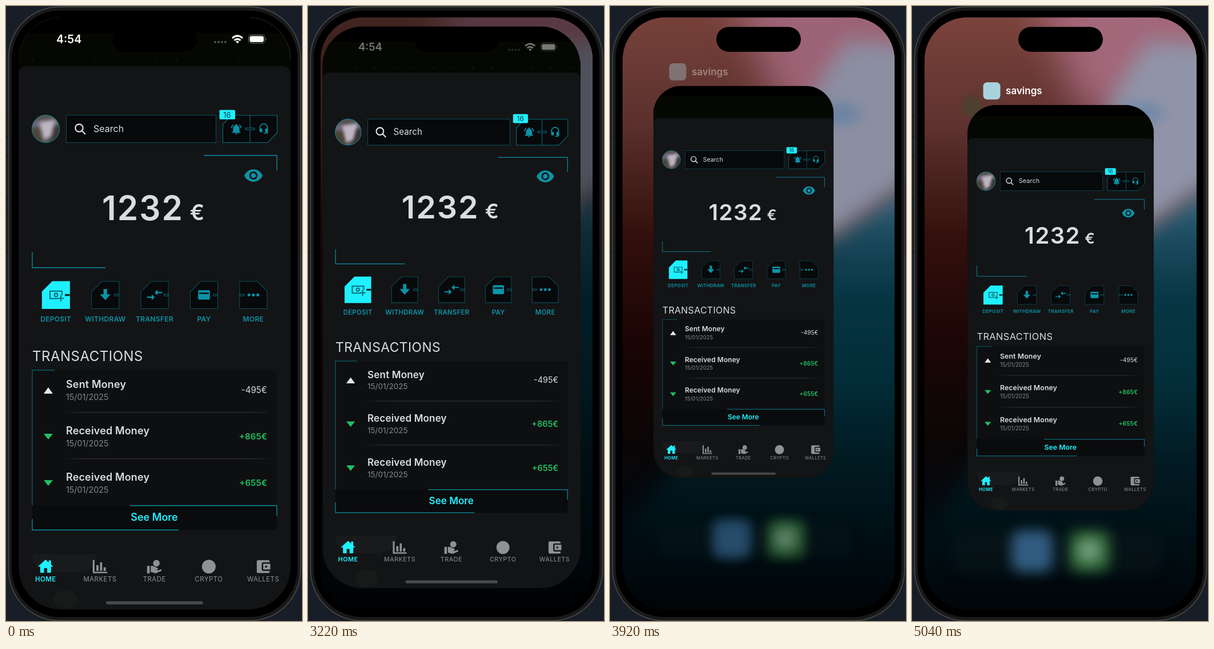
An HTML page that plays this animation: 518 px wide and 1074 px high, repeating every 8000 ms.

```html
<!DOCTYPE html>
<html lang="en">
<head>
<meta charset="utf-8">
<title>App switcher</title>
<style>
  html, body { margin: 0; width: 100%; height: 100%; overflow: hidden; background: #181e27; }
  svg { display: block; width: 100vw; height: 100vh; }
  filter { color-interpolation-filters: sRGB; }
  text { font-family: Inter, "Open Sans", sans-serif; fill: #d9dde1; }
  .b { font-weight: 600; }
  .line { fill: none; stroke: #0b8fa2; stroke-width: 1.3; }
  .box { fill: #07090b; stroke: #0b4c56; stroke-width: 1.1; }
</style>
</head>
<body>
<svg viewBox="0 0 518 1074" preserveAspectRatio="none">
  <defs>
    <clipPath id="screen"><rect x="22" y="20" width="476" height="1034" rx="74"/></clipPath>
    <clipPath id="face"><circle cx="69.5" cy="214.5" r="24"/></clipPath>
    <linearGradient id="red" x2="0" y2="1">
      <stop stop-color="#7b433c"/><stop offset=".18" stop-color="#5e322f"/>
      <stop offset=".37" stop-color="#34100d"/><stop offset=".55" stop-color="#1b0605"/>
      <stop offset=".72" stop-color="#0b0607"/><stop offset=".85" stop-color="#030b10"/>
      <stop offset="1" stop-color="#000508"/>
    </linearGradient>
    <linearGradient id="teal" gradientUnits="userSpaceOnUse" x1="0" y1="310" x2="0" y2="1054">
      <stop stop-color="#3a7088"/><stop offset=".12" stop-color="#1d4d60"/>
      <stop offset=".27" stop-color="#073644"/><stop offset=".45" stop-color="#03303b"/>
      <stop offset=".66" stop-color="#021a22"/><stop offset=".85" stop-color="#010f15"/>
      <stop offset="1" stop-color="#000508"/>
    </linearGradient>
    <linearGradient id="fade"><stop stop-color="#333537" stop-opacity="0"/><stop offset=".1" stop-color="#333537"/>
      <stop offset=".9" stop-color="#333537"/><stop offset="1" stop-color="#333537" stop-opacity=".3"/></linearGradient>
    <filter id="wide" x="-50%" y="-50%" width="200%" height="200%"><feGaussianBlur stdDeviation="32"/></filter>
    <filter id="mid" x="-50%" y="-50%" width="200%" height="200%"><feGaussianBlur stdDeviation="18"/></filter>
    <filter id="soft" x="-50%" y="-50%" width="200%" height="200%"><feGaussianBlur stdDeviation="11"/></filter>
    <filter id="fine" x="-50%" y="-50%" width="200%" height="200%"><feGaussianBlur stdDeviation="3"/></filter>
  </defs>

  <!-- phone body -->
  <g fill="#1d1d1e" stroke="#050506">
    <path d="M-2 190.500H5V228H-2zM-2 262.500H5V336H-2zM-2 356.500H5V430H-2zM514 310.500H520V428H514z"/>
  </g>
  <rect x="4.500" y="1.500" width="511" height="1072" rx="89" fill="#19191a" stroke="#4b4b4d" stroke-width="1.500"/>
  <rect x="10" y="8" width="500" height="1059" rx="84"/>

  <g clip-path="url(#screen)">
    <g id="wallpaper">
      <rect x="22" y="20" width="476" height="1034" fill="url(#red)"/>
      <path d="M200 -60H600V160L300 190z" fill="#a3677a" filter="url(#wide)"/>
      <path d="M580 270L380 405L240 620L75 850L-40 1000V1140H580z" fill="url(#teal)" filter="url(#mid)"/>
      <path d="M345 165L412 62L580 70V272L385 408L320 400z" fill="#9094a8" filter="url(#mid)"/>
      <ellipse cx="402" cy="188" rx="38" ry="18" fill="#5f82a8" opacity=".7" filter="url(#soft)"/>
    </g>
    <g id="dock">
      <circle cx="105" cy="175" r="18" fill="#4d4030" filter="url(#fine)"/>
      <rect x="70" y="914" width="370" height="76" rx="26" fill="#0a161a" opacity=".65" filter="url(#soft)"/>
      <rect x="174" y="916" width="72" height="72" rx="18" fill="#305c80" filter="url(#soft)"/>
      <rect x="275" y="916" width="72" height="72" rx="18" fill="#2f6638" filter="url(#soft)"/>
      <circle cx="310" cy="951" r="20" fill="#7ba484" opacity=".9" filter="url(#soft)"/>
    </g>
    <rect id="dim" x="22" y="20" width="476" height="1034"/>
    <g id="label">
      <rect width="30" height="30" rx="7" fill="#a8d3dd"/>
      <text class="b" x="39.500" y="21" font-size="17" style="fill:#fff">savings</text>
    </g>
    <g id="card"></g>
    <rect x="186" y="36.500" width="148" height="43.500" rx="21.700"/>
  </g>
</svg>

<script>
const $ = id => document.getElementById(id);
const TEAL = '#0b93a6', CYAN = '#1ff0ff', GREEN = '#21c065', GREY = '#8f9193';

const text = (x, y, size, str, o = {}) =>
  `<text x="${x}" y="${y}" font-size="${size}" class="${o.bold ? 'b' : ''}" text-anchor="${o.anchor || 'start'}"
    letter-spacing="${o.gap || 0}" ${o.color ? `style="fill:${o.color}"` : ''}>${str}</text>`;
// Icons live on a 24-unit grid and are centred on (x, y).
const icon = (x, y, scale, d, color = TEAL) =>
  `<path transform="translate(${x} ${y}) scale(${scale}) translate(-12 -12)" d="${d}" fill="${color}" fill-rule="evenodd"/>`;
const line = (d, extra = '') => `<path class="line" d="${d}" ${extra}/>`;

const ICONS = {
  eye: 'M12 4.5C7 4.5 2.7 7.6 1 12c1.700 4.400 6 7.500 11 7.500s9.300-3.100 11-7.500c-1.700-4.400-6-7.500-11-7.500zM12 17a5 5 0 1 1 0-10 5 5 0 0 1 0 10zM12 15a3 3 0 1 0 0-6 3 3 0 0 0 0 6z',
  bell: 'M12 22a2 2 0 0 0 2-2h-4a2 2 0 0 0 2 2zM18 16v-5c0-3.100-1.600-5.600-4.500-6.300V4a1.500 1.500 0 0 0-3 0v.7C7.600 5.400 6 7.900 6 11v5l-2 2v1h16v-1zM2 10c.2-3 1.500-5.500 4-7l1 1.500C5 6 4 8 4 10zM22 10c-.2-3-1.500-5.500-4-7l-1 1.500C19 6 20 8 20 10z',
  headset: 'M12 1a9 9 0 0 0-9 9v7a3 3 0 0 0 3 3h3v-8H5v-2a7 7 0 0 1 14 0v2h-4v8h4v1h-7v2h6a3 3 0 0 0 3-3V10a9 9 0 0 0-9-9z',
  down: 'M9 2h6v9h6l-9 10-9-10h6z',
  swap: 'M-1 15h8v-4l5 5-5 5v-4h-8zM25 7h-8V3l-5 5 5 5V9h8z',
  pay: 'M4 4h16a2 2 0 0 1 2 2v12a2 2 0 0 1-2 2H4a2 2 0 0 1-2-2V6a2 2 0 0 1 2-2zM4 8v2.500h16V8z',
  more: 'M7 12a2.500 2.500 0 1 1-5 0 2.500 2.500 0 0 1 5 0zM14.500 12a2.500 2.500 0 1 1-5 0 2.500 2.500 0 0 1 5 0zM22 12a2.500 2.500 0 1 1-5 0 2.500 2.500 0 0 1 5 0z',
  home: 'M10 20v-6h4v6h5v-8h3l-3-2.700V4h-3v2.600L12 3 2 12h3v8z',
  bars: 'M2 3h2.500v16H22v2H2zM7 10h3v8H7zM12 6h3v12h-3zM17 13h3v5h-3z',
  trade: 'M20 7a5 5 0 1 1-10 0 5 5 0 0 1 10 0zM1 11h4v11H1zM6.500 11h3l7 3q2 2-.5 3h-4l6 .5 3-1.500q2.500 0 1.500 2.500L14 22l-7.500-2z',
  coin: 'M22 12a10 10 0 1 1-20 0 10 10 0 0 1 20 0z',
  wallet: 'M21 18v1a2 2 0 0 1-2 2H5a2 2 0 0 1-2-2V5a2 2 0 0 1 2-2h14a2 2 0 0 1 2 2v1h-9a2 2 0 0 0-2 2v8a2 2 0 0 0 2 2zM12 16h10V8H12zM16 13.500a1.500 1.500 0 1 1 0-3 1.500 1.500 0 0 1 0 3z'
};

function statusBar() {
  const dots = [366, 372, 378, 384].map(x => `<circle cx="${x}" cy="63" r="2" fill="#505153"/>`).join('');
  const wave = (r, y) => `<path d="M${405 - r} ${y}Q405 ${y - r * .85} ${405 + r} ${y}" fill="none" stroke="#fff" stroke-width="3"/>`;
  return `<g id="status">${text(88, 65, 19.500, '4:54', { bold: 1, color: '#fff' })}${dots}
    ${wave(9, 56)}${wave(5.500, 60)}<path d="M402 62q3-2 6 0l-3 3.500z" fill="#fff"/>
    <rect x="424.500" y="50.500" width="28.500" height="14.500" rx="4.500" fill="none" stroke="#77797a"/>
    <rect x="426.500" y="52.500" width="24.500" height="10.500" rx="3" fill="#fff"/>
    <path d="M454.500 55.500q2 2 0 4.500z" fill="#77797a"/></g>`;
}

function header() {
  let dots = '';
  for (let x = 47; x < 490; x += 36)
    for (const y of [96, 267, 298, 329, 360, 391]) dots += `<circle cx="${x}" cy="${y}" r=".8"/>`;
  return `<g fill="#34383b">${dots}</g>
    <g clip-path="url(#face)"><g filter="url(#fine)">
      <rect x="30" y="175" width="80" height="80" fill="#54504e"/>
      <path d="M40 200H100V212H40z" fill="#6d6478"/>
      <path d="M58 203L86 198L84 226L66 234z" fill="#bdb5c4"/>
      <path d="M30 216L60 212L68 255H30z" fill="#4c4339"/><path d="M84 208H110V255H72z" fill="#3a3533"/>
    </g></g>
    <circle cx="69.500" cy="214.500" r="24" class="line" style="stroke-width:1"/>
    <rect class="box" x="105.500" y="190.500" width="262" height="48"/>
    <g fill="none" stroke="#dfe3e6" stroke-width="2.200"><circle cx="128" cy="213" r="6.700"/><path d="M133 218l6 6"/></g>
    ${text(153, 219.500, 16, 'Search')}
    <path class="box" style="stroke:#0b6c79" d="M379.500 238.500V207L395 191H474.500V221L458 238.500zM427 191V238.500"/>
    <path d="M419 213h16v3h-16z" fill="#07090b" stroke="${TEAL}" stroke-width=".8"/>
    ${icon(403, 215, .92, ICONS.bell)}${icon(451, 214, .82, ICONS.headset)}
    <rect x="373.500" y="181.500" width="27.500" height="16.500" rx="2" fill="${CYAN}"/>
    ${text(387, 194.500, 13, '16', { anchor: 'middle', color: '#0a3f48' })}
    ${line('M346 261H474V287.500M46 430V457H174')}
    ${icon(433, 296, 1.45, ICONS.eye)}
    ${text(168, 374, 58.500, '1232', { bold: 1, gap: 2 })}${text(321.500, 374, 38, '€', { bold: 1 })}`;
}

function actions() {
  return ['DEPOSIT', 'WITHDRAW', 'TRANSFER', 'PAY', 'MORE'].map((name, i) => {
    const x = 87.3 + 86.4 * i, first = i === 0, last = i === 4, L = x - 24, R = x + 24;
    const shape = last ? `M${L} 481H${R - 17}L${R} 498V528.500H${L}z` : `M${L} 528.500V499L${L + 18} 481H${R}V528.500z`;
    const glyph = first
      ? `<g fill="none" stroke="#08707e" stroke-width="2.200"><path d="M91 511H77V498H98V505M96 505V516M90.500 510.500H101.500"/><circle cx="87.500" cy="504.500" r="2.800"/></g>`
      : icon(x, 504.500, 1.03, ICONS[['', 'down', 'swap', 'pay', 'more'][i]]);
    return `<path class="box" d="${shape}" ${first ? `style="fill:${CYAN};stroke:${CYAN}"` : ''}/>
      <path d="M${last ? L : R - 8} 503.200h8v3h-8z" fill="#07090b" stroke="${first ? '#08707e' : TEAL}" stroke-width=".7"/>
      ${glyph}${text(x, 551, 12, name, { bold: 1, anchor: 'middle', gap: .3, color: TEAL })}`;
  }).join('');
}

function transactions() {
  const rows = [['Sent', '-495€'], ['Received', '+865€'], ['Received', '+655€']].map(([verb, sum], i) => {
    const out = i === 0;
    return `<g transform="translate(0 ${81 * i})">
      <path d="${out ? 'M66 677L74 666L82 677z' : 'M66 666L74 676L82 666z'}" fill="${out ? '#e4e6e8' : GREEN}"/>
      ${text(105, 667, 18, verb + ' Money', { bold: 1, gap: .15 })}
      ${text(105, 687.500, 14.300, '15/01/2025', { color: '#85888b' })}
      ${text(457, 676, 15.200, sum, { anchor: 'end', bold: !out, color: out ? '' : GREEN })}
      ${i < 2 ? '<rect x="100" y="709" width="358" height="1.200" fill="url(#fade)"/>' : ''}</g>`;
  }).join('');
  return `${text(46, 619.500, 24, 'TRANSACTIONS', { gap: .5 })}
    <rect x="46" y="636" width="428" height="279" fill="#0e0f11"/>
    <rect x="46" y="872" width="428" height="43" fill="#0a0b0d"/>
    ${line('M85 636H46V872', 'opacity=".6"')}${rows}
    ${line('M217 872.500H474V891M46 896V915H302')}
    ${text(259.500, 899, 18, 'See More', { bold: 1, anchor: 'middle', color: CYAN })}`;
}

function navigation() {
  const items = [['HOME', 'home', 1.35], ['MARKETS', 'bars', 1.27], ['TRADE', 'trade', 1.17], ['CRYPTO', 'coin', 1.2], ['WALLETS', 'wallet', 1.25]];
  return `<path d="M46 957H158Q160 986 130 989H70Q46 982 46 957z" fill="#191a1b"/>
    <ellipse cx="104" cy="1036" rx="22" ry="16" fill="#181a1a"/>` +
    items.map(([name, key, scale], i) => {
      const x = 69.3 + 95.2 * i, color = i ? GREY : CYAN;
      return icon(x, 979, scale, ICONS[key], color) +
        text(x, 1004.500, 11.400, name, { bold: !i, anchor: 'middle', gap: .5, color });
    }).join('') + '<rect id="homeBar" x="175" y="1039.500" width="170" height="5.500" rx="2.700" fill="#48494b"/>';
}

$('card').innerHTML = `<g clip-path="url(#screen)">
  <rect x="22" y="20" width="476" height="1034"/>
  <rect x="22" y="48" width="476" height="80" fill="#050802"/>
  <rect x="22" y="105" width="476" height="970" rx="13" fill="#131416"/>
  ${statusBar()}${header()}${actions()}${transactions()}${navigation()}</g>`;

// time, card scale, card x, card y, then opacities: dim, status, label, dock, homeBar
const KEYS = [
  [3010, 1, 0, 0, .6, 1, 0, 0, 1],
  [3360, .894, 10.3, 35.3, .32, .12, 0, 0, 1],
  [3920, .6625, 61.4, 126.2, .03, 0, .38, .85, 1],
  [4200, .6825, 80, 156, 0, 0, 1, .97, 0],
  [5040, .685, 82, 159, 0, 0, 1, 1, 0]
];
const FADING = ['dim', 'status', 'label', 'dock', 'homeBar'];

// Monotone cubic interpolation through the keys.
function sample(t, c) {
  const last = KEYS.length - 1;
  if (t <= KEYS[0][0]) return KEYS[0][c];
  if (t >= KEYS[last][0]) return KEYS[last][c];
  const slope = i => (KEYS[i + 1][c] - KEYS[i][c]) / (KEYS[i + 1][0] - KEYS[i][0]);
  const tangent = i => {
    if (i === 0 || i === last) return 0;
    const a = slope(i - 1), b = slope(i);
    return a * b > 0 ? 2 * a * b / (a + b) : 0;
  };
  const i = KEYS.findIndex(k => k[0] > t) - 1;
  const span = KEYS[i + 1][0] - KEYS[i][0], u = (t - KEYS[i][0]) / span, v = 1 - u;
  return KEYS[i][c] * v * v * (1 + 2 * u) + KEYS[i + 1][c] * u * u * (3 - 2 * u)
    + span * u * v * (tangent(i) * v - tangent(i + 1) * u);
}

const STEP = 70, LOOP = 8000, start = performance.now();
const move = (id, transform) => $(id).setAttribute('transform', transform);

function draw() {
  const t = Math.floor((performance.now() - start) % LOOP / STEP) * STEP;
  const [s, x, y] = [1, 2, 3].map(c => sample(t, c));
  move('card', `translate(${x} ${y}) scale(${s})`);
  move('label', `translate(${x + 22 * s + 27.5} ${y + 20 * s - 39.5})`);
  move('dock', `translate(261 592) scale(${.6 + .4 * sample(t, 7)}) translate(-261 -592)`);
  FADING.forEach((id, i) => $(id).setAttribute('opacity', sample(t, 4 + i)));
  requestAnimationFrame(draw);
}
draw();
</script>
</body>
</html>
```
